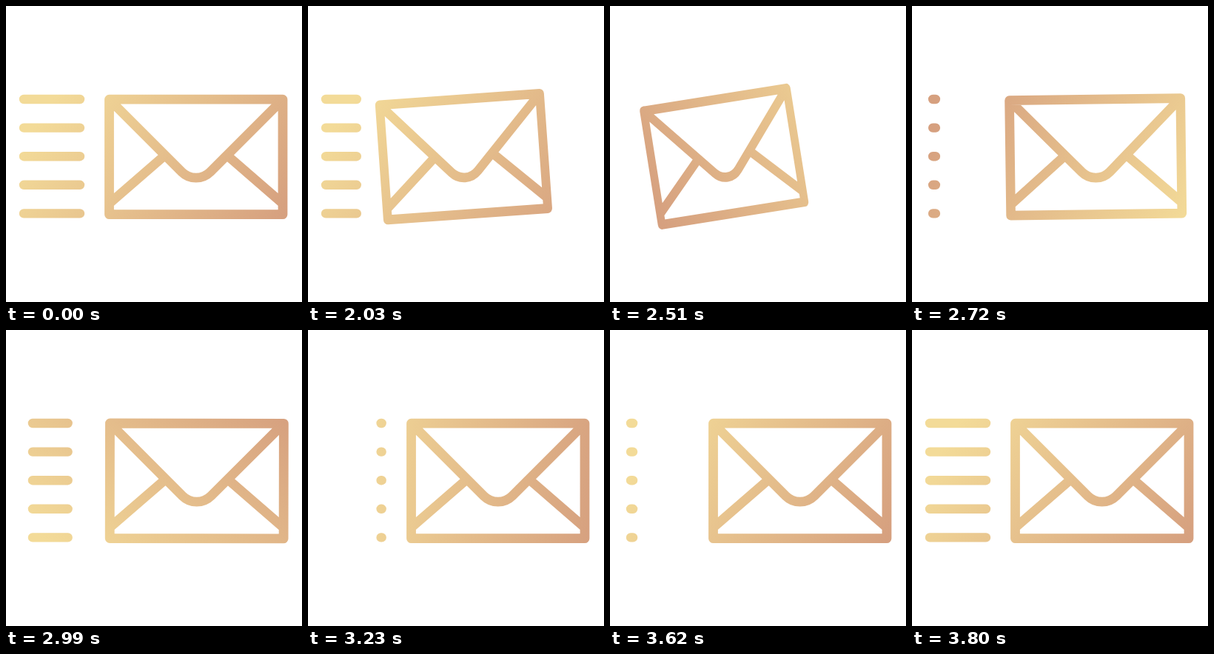
Animation of 400 by 400 pixels, one loop 3.83 s. Source, as an HTML page with a canvas:

```html
<!DOCTYPE html>
<html lang="en">
<head>
<meta charset="utf-8">
<title>Sending mail</title>
<style>
  html, body { margin: 0; width: 100%; height: 100%; overflow: hidden; background: #fff; }
  canvas { display: block; width: 400px; height: 400px; }
</style>
</head>
<body>
<canvas width="400" height="400"></canvas>
<script>
const LOOP = 3830, REST = 2030, STEP = 30;
const canvas = document.querySelector('canvas');
const ctx = canvas.getContext('2d');
const ratio = window.devicePixelRatio || 1;
canvas.width = canvas.height = 400 * ratio;

const smooth = u => u * u * (3 - 2 * u);
const easeOut = u => 1 - (1 - u) ** 3;
const linear = u => u;

// Each key: [time, value, easing from the previous key]
const pullKeys = [
  [2030, 0.45], [2430, 1.02, easeOut], [2540, 0.99, smooth],
  [2720, 0.083, smooth], [2990, -0.01, easeOut], [3110, 0, smooth]
];
const angleKeys = [
  [2030, 38], [2510, 149], [2720, 215], [2990, 313], [3200, 365], [3440, 383], [3800, 395]
];
// Head and tail of a streak during one pass to the left
const headKeys = [[0, 100], [0.53, 36], [0.93, 28], [1, 14]];
const tailKeys = [[0, 100], [0.53, 84], [0.93, 31], [1, 14]];
const passes = [[2540, 2735], [2745, 3205], [3225, 3650]];

function sample(keys, x) {
  if (x <= keys[0][0]) return keys[0][1];
  for (let i = 1; i < keys.length; i++) {
    const [x0, v0] = keys[i - 1], [x1, v1, ease = linear] = keys[i];
    if (x <= x1) return v0 + (v1 - v0) * ease((x - x0) / (x1 - x0));
  }
  return keys[keys.length - 1][1];
}

function streakEnds(t, pull) {
  if (t < REST) return [24, 100];
  if (t < 2540) return pull < 0.995 ? [24, 24 + 76 * (1 - pull)] : null;
  if (t > 3650) return [100 - 76 * easeOut((t - 3650) / 150), 100];
  const pass = passes.find(([from, to]) => t > from && t < to);
  if (!pass) return null;
  const u = (t - pass[0]) / (pass[1] - pass[0]);
  return [sample(headKeys, u), sample(tailKeys, u)];
}

const envelope = new Path2D(
  'M139.5 126.2H374V281.7H139.5Z' +
  'M139.5 126.2L237.5 224.2A27.3 27.3 0 0 0 276 224.2L374 126.2' +
  'M139.5 267L211 205M374 267L302.5 205'
);

function drawStreaks([x1, x2]) {
  ctx.lineWidth = 12.4;
  ctx.beginPath();
  for (let i = 0; i < 5; i++) {
    const y = 126 + 38.6 * i;
    ctx.moveTo(x1, y);
    ctx.lineTo(Math.max(x2, x1 + 0.1), y);
  }
  ctx.stroke();
}

function drawEnvelope(pull) {
  ctx.save();
  ctx.translate(256.75 - 103 * pull, 203.9 - 0.6 * pull);
  ctx.rotate(-9.1 * pull * Math.PI / 180);
  ctx.scale(1 - 0.168 * pull, 1);
  ctx.translate(-256.75, -203.9);
  ctx.lineWidth = 12.8;
  ctx.stroke(envelope);
  ctx.restore();
}

// Colours everything drawn so far with the turning gradient
function tint(degrees) {
  const a = degrees * Math.PI / 180;
  const cx = 220, cy = 204;
  const dx = 174 * Math.cos(a), dy = 174 * Math.sin(a);
  const paint = ctx.createLinearGradient(cx - dx, cy - dy, cx + dx, cy + dy);
  paint.addColorStop(0, '#f3db98');
  paint.addColorStop(1, '#d6a07f');
  ctx.globalCompositeOperation = 'source-in';
  ctx.fillStyle = paint;
  ctx.fillRect(0, 0, 400, 400);
  ctx.globalCompositeOperation = 'source-over';
}

function draw(time) {
  let t = time % LOOP;
  const resting = t < REST;
  if (!resting) t = REST + Math.floor((t - REST) / STEP) * STEP;
  const pull = resting ? 0 : sample(pullKeys, t);
  const ends = streakEnds(t, pull);

  ctx.setTransform(ratio, 0, 0, ratio, 0, 0);
  ctx.clearRect(0, 0, 400, 400);
  ctx.lineCap = ctx.lineJoin = 'round';
  if (ends) drawStreaks(ends);
  drawEnvelope(pull);
  tint(resting ? 35 : sample(angleKeys, t));
}

const start = performance.now();
function tick() {
  draw(performance.now() - start);
  requestAnimationFrame(tick);
}
tick();
</script>
</body>
</html>
```
